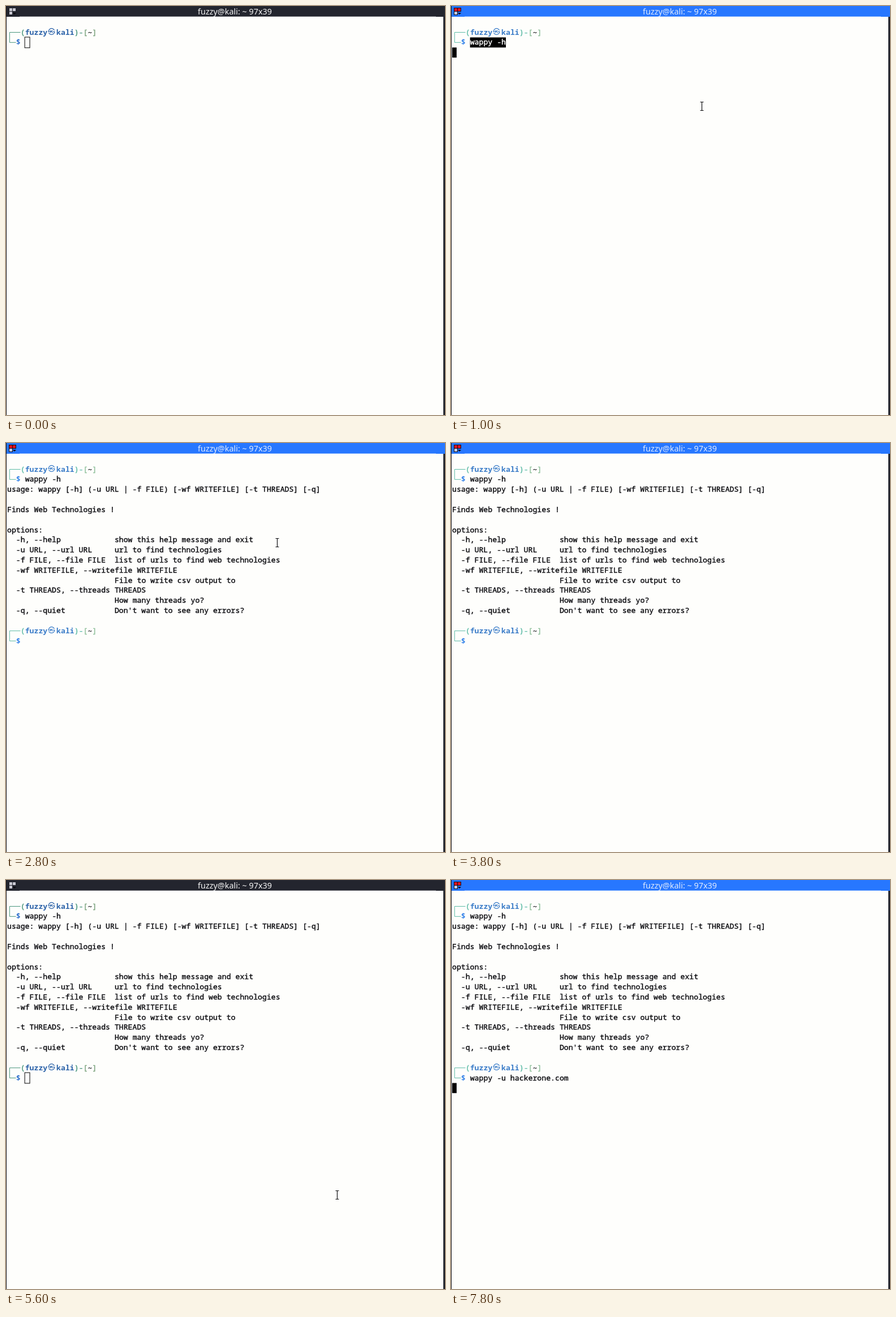
These frames come from a looping animation (776 px wide and 722 px high, 8000 ms). An HTML page:

```html
<!DOCTYPE html>
<html lang="en">
<head>
<meta charset="utf-8">
<title>Terminal</title>
<style>
  html, body { margin: 0; width: 100%; height: 100%; overflow: hidden; background: #fefefc; }
  svg { display: block; }
  text { white-space: pre; font: 500 13.2px "Noto Sans Mono", "DejaVu Sans Mono", monospace; stroke-width: 0.4px; }
  .bold { font-weight: 700; stroke-width: 0; }
  .title { font: 400 14.4px "Noto Sans", "Open Sans", sans-serif; text-anchor: middle; }
  .symbol { font: 700 12.5px "Noto Sans CJK KR", "Noto Sans CJK JP", "Noto Sans CJK SC", sans-serif; text-anchor: middle; }
</style>
</head>
<body>
<svg id="stage" width="776" height="722" viewBox="0 0 776 722"></svg>
<script>
const LOOP = 8000, TICK = 200;
const CELL = 7.92, ROW = 17.82, LEFT = 1.98, TOP = 19.8;
const USER = 'fuzzy', HOST = 'kali';
const INK = '#0c0c10';

const THEMES = {
  idle: { bar: '#23252e', title: '#f4f4f4', line: '#48957c', name: '#2b62a8', bracket: '#7aa27c', dollar: '#2a6ccb' },
  active: { bar: '#2777ff', title: '#dfebff', line: '#5dbba6', name: '#3a7cc8', bracket: '#8fc09a', dollar: '#2f7fe8' }
};

const HELP = [
  [3, 'usage: wappy [-h] (-u URL | -f FILE) [-wf WRITEFILE] [-t THREADS] [-q]'],
  [5, 'Finds Web Technologies !'],
  [7, 'options:'],
  [8, '  -h, --help            show this help message and exit'],
  [9, '  -u URL, --url URL     url to find technologies'],
  [10, '  -f FILE, --file FILE  list of urls to find web technologies'],
  [11, '  -wf WRITEFILE, --writefile WRITEFILE'],
  [12, '                        File to write csv output to'],
  [13, '  -t THREADS, --threads THREADS'],
  [14, '                        How many threads yo?'],
  [15, "  -q, --quiet           Don't want to see any errors?"]
];

// Each command: prompt row, paste time, enter time, time the highlight clears.
const COMMANDS = [
  { row: 1, text: 'wappy -h', paste: 800, enter: 1000, clear: 1400 },
  { row: 17, text: 'wappy -u hackerone.com', paste: 6600, enter: 6800, clear: 7000 }
];
const HELP_AT = 2400;

// Pointer visits: [time, x, y] keys.
const POINTER = [
  [[200, 730, 190], [400, 590, 184], [600, 480, 179], [800, 443, 177], [1200, 443, 177],
   [2200, 454, 176], [2800, 479, 176], [3200, 540, 400], [3400, 600, 712]],
  [[5400, 620, 712], [5800, 550, 400], [6000, 533, 302], [6400, 533, 302]]
];

// Times at which the text cursor switches, starting from visible.
const BLINKS = [1600, 2200, 2600, 3200, 3800, 4400, 6600, 6800, 7400, 7800];

const px = col => LEFT + col * CELL;
const py = row => TOP + row * ROW;
const escape = s => s.replace(/&/g, '&amp;').replace(/</g, '&lt;');
const rect = (x, y, w, h, fill, extra = '') =>
  `<rect x="${x}" y="${y}" width="${w}" height="${h}" fill="${fill}" ${extra}/>`;
const write = (col, row, s, fill = INK, cls = '') =>
  `<text x="${px(col)}" y="${py(row) + 13}" fill="${fill}" stroke="${fill}" class="${cls}">${escape(s)}</text>`;

function line(row, s) {
  const indent = s.length - s.trimStart().length;
  return write(indent, row, s.trimStart());
}

function prompt(row, c) {
  const y = py(row) + 8.9;
  return `<path d="M25.5 ${y}H6.4v${ROW}H17.6" fill="none" stroke="${c.line}"/>` +
    write(3, row, '(', c.line) +
    write(4, row, USER, c.name, 'bold') +
    `<text x="80.5" y="${py(row) + 12.6}" fill="${c.name}" class="symbol">㉿</text>` +
    write(11, row, HOST, c.name, 'bold') +
    write(15, row, ')-', c.line) +
    write(17, row, '[', c.bracket) +
    write(18, row, '~', INK, 'bold') +
    write(19, row, ']', c.bracket) +
    write(2, row + 1, '$', c.dollar, 'bold');
}

function command(cmd, t) {
  if (t < cmd.paste) return '';
  const row = cmd.row + 1, marked = t < cmd.clear;
  const back = marked ? rect(px(4), py(row), cmd.text.length * CELL, ROW, '#000') : '';
  return back + write(4, row, cmd.text, marked ? '#fff' : INK);
}

function cursor(t, focused) {
  const cmd = COMMANDS[t < HELP_AT ? 0 : 1];
  const entered = t >= cmd.enter;
  const row = cmd.row + (entered ? 2 : 1);
  const col = entered ? 0 : 4 + (t >= cmd.paste ? cmd.text.length : 0);
  const x = px(col), y = py(row);
  if (!focused) return rect(x - 0.5, y - 0.5, CELL + 1, ROW + 1, 'none', 'stroke="#000"');
  const visible = BLINKS.filter(b => b <= t).length % 2 === 0;
  return visible ? rect(x, y, CELL, ROW, '#000') : '';
}

function groupIcon(focused) {
  const main = focused ? '#e01222' : '#c9c9d2';
  const pale = focused ? '#c3cbe6' : '#c9c9d2';
  const edge = focused ? '#101018' : '#23252e';
  const box = (x, y, fill) => rect(x, y, 6, 6, fill, `stroke="${edge}"`);
  return box(5.5, 3.5, main) + box(11.5, 3.5, main) + box(5.5, 9.5, pale) +
    `<path d="M12 12H18L15 15Z" fill="#08080c"/>`;
}

function titleBar(c, focused) {
  return rect(773, 18, 3, 704, '#23252e') + rect(0, 0, 776, 19, c.bar) +
    rect(24, 18, 736, 1, '#fefefc', 'opacity="0.35"') +
    rect(0, 0, 1, 722, '#101018') + groupIcon(focused) +
    `<text class="title" x="404.6" y="15" fill="${c.title}">${USER}@${HOST}: ~ 97x39</text>`;
}

function pointer(t) {
  const keys = POINTER.find(k => t >= k[0][0] && t <= k[k.length - 1][0]);
  if (!keys) return '';
  const i = Math.max(1, keys.findIndex(k => k[0] >= t));
  const [a, b] = [keys[i - 1], keys[i]];
  const f = (t - a[0]) / (b[0] - a[0]);
  const x = Math.round(a[1] + (b[1] - a[1]) * f) + 0.5;
  const y = Math.round(a[2] + (b[2] - a[2]) * f);
  const d = `M${x - 3} ${y - 7.5}h2.5l.5 1l.5-1h2.5M${x} ${y - 7}v14M${x - 3} ${y + 7.5}h2.5l.5-1l.5 1h2.5`;
  return `<path d="${d}" fill="none" stroke="#fff" stroke-width="3"/>` +
    `<path d="${d}" fill="none" stroke="#111" stroke-width="1.2"/>`;
}

function draw(t) {
  const focused = (t >= 600 && t < 4600) || t >= 6000;
  const c = focused ? THEMES.active : THEMES.idle;
  let out = rect(0, 0, 776, 722, '#fefefc') + titleBar(c, focused) +
    prompt(1, c) + command(COMMANDS[0], t);
  if (t >= HELP_AT) {
    out += HELP.map(([row, s]) => line(row, s)).join('') +
      prompt(17, c) + command(COMMANDS[1], t);
  }
  return out + cursor(t, focused) + pointer(t);
}

const stage = document.getElementById('stage');
const start = performance.now();
let shown = -1;

function frame() {
  const elapsed = Math.max(0, performance.now() - start) % LOOP;
  const t = Math.floor(elapsed / TICK) * TICK;
  if (t !== shown) {
    stage.innerHTML = draw(t);
    shown = t;
  }
  requestAnimationFrame(frame);
}
frame();
</script>
</body>
</html>
```
